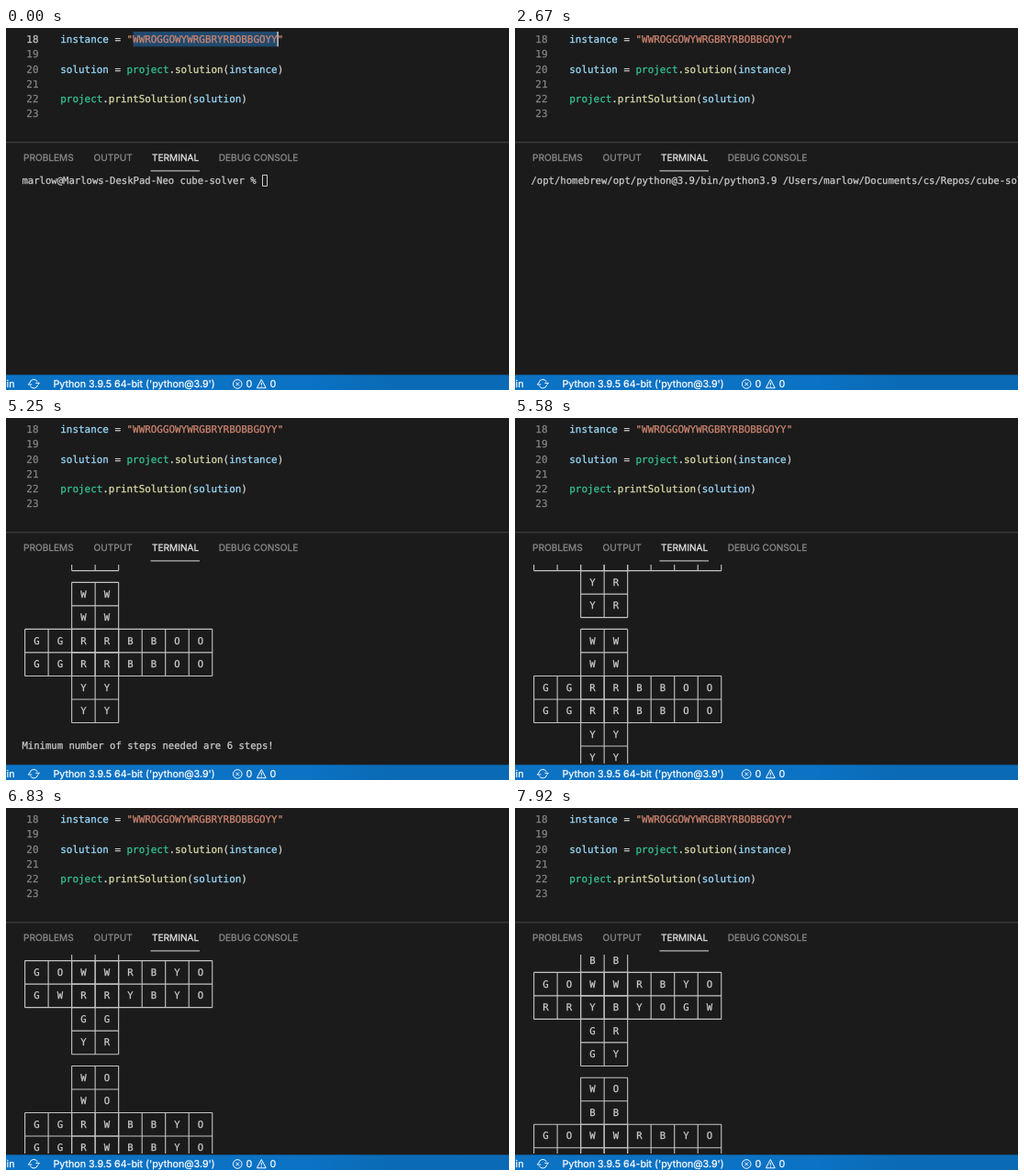
These frames come from a looping animation (548 by 395 pixels, 8 s). An HTML page with a canvas:

```html
<!DOCTYPE html>
<html lang="en">
<head>
<meta charset="utf-8">
<title>Cube solver</title>
<style>
  html, body { margin: 0; width: 100%; height: 100%; overflow: hidden; background: #1b1b1b; }
  canvas { display: block; }
</style>
</head>
<body>
<canvas id="stage" width="548" height="395"></canvas>
<script>
const ctx = document.getElementById('stage').getContext('2d');
const LOOP = 8000;
const MONO = '"DejaVu Sans Mono", monospace';
const SANS = 'Inter, sans-serif';
const EDITOR_FONT = '10.91px ' + MONO;
const TERM_FONT = '10.6px ' + MONO;
const TERM = { x: 17.4, y: 166.2, char: 6.38, row: 12.76 };
const CELL = { w: 4 * TERM.char, h: 2 * TERM.row };

const COLOR = {
  bg: '#1b1b1b', variable: '#9cdcfe', plain: '#d4d4d4', string: '#ce8570',
  module: '#35c795', call: '#dcdcaa', dim: '#858585', term: '#cccccc', grid: '#c4c4c4'
};

const CODE = [
  [['instance', 'variable'], [' = ', 'plain'], ['"WWROGGOWYWRGBRYRBOBBGOYY"', 'string']],
  [],
  [['solution', 'variable'], [' = ', 'plain'], ['project', 'module'], ['.', 'plain'],
   ['solution', 'call'], ['(', 'plain'], ['instance', 'variable'], [')', 'plain']],
  [],
  [['project', 'module'], ['.', 'plain'], ['printSolution', 'call'], ['(', 'plain'],
   ['solution', 'variable'], [')', 'plain']],
  []
];

const PROMPT = 'marlow@Marlows-DeskPad-Neo cube-solver % ';
const COMMAND = '/opt/homebrew/opt/python@3.9/bin/python3.9 ' +
  '/Users/marlow/Documents/cs/Repos/cube-solver/project.py';

// Unfolded cubes, latest first: two rows up, two around, two down.
const CUBES = [
  'WW WW GGRRBBOO GGRRBBOO YY YY',
  'WO WO GGRWBBYO GGRWBBYO YR YR',
  'WO BB GOWWRBYO GWRRYBYO GG YR',
  'WO BB GOWWRBYO RRYBYOGW GR GY'
].map(cube => cube.split(' '));

const EVENTS = { deselect: 1670, run: 2330, output: 2750, prompt: 2920 };
// [time, lines scrolled back]
const SCROLL = [[5200, 0], [5580, 5], [6830, 22], [7080, 24], [7460, 24], [7920, 36]];

function scrollAt(t) {
  if (t <= SCROLL[0][0]) return 0;
  for (let i = 1; i < SCROLL.length; i++) {
    const [t0, v0] = SCROLL[i - 1], [t1, v1] = SCROLL[i];
    if (t <= t1) return Math.round(v0 + (v1 - v0) * (t - t0) / (t1 - t0));
  }
  return SCROLL[SCROLL.length - 1][1];
}

// A hairline outline gives the slightly heavier stems of smoothed screen text.
function text(str, x, y, font, color, align = 'left') {
  ctx.font = font;
  ctx.fillStyle = ctx.strokeStyle = color;
  ctx.textAlign = align;
  ctx.lineWidth = 0.25;
  ctx.fillText(str, x, y);
  ctx.strokeText(str, x, y);
}

function rect(x, y, w, h, color) {
  ctx.fillStyle = color;
  ctx.fillRect(x, y, w, h);
}

function drawEditor(t) {
  const selected = t < EVENTS.deselect;
  if (selected) rect(138.5, 4, 157.5, 16.3, '#20496d');
  CODE.forEach((tokens, i) => {
    const y = 16.1 + i * 16.27;
    text(18 + i, 35.5, y, EDITOR_FONT, i === 0 && selected ? '#c6c6c6' : COLOR.dim, 'right');
    let x = 59.3;
    for (const [str, kind] of tokens) {
      text(str, x, y, EDITOR_FONT, COLOR[kind]);
      x += ctx.measureText(str).width;
    }
  });
  const caretOn = (t + 830) % 1000 >= 500;
  if (selected && caretOn) rect(295.3, 4, 1.6, 16.3, '#c0c0bc');
}

function drawTabs() {
  rect(0, 124.3, 548, 1, '#454545');
  const tabs = [['PROBLEMS', 19], ['OUTPUT', 95.5], ['TERMINAL', 159], ['DEBUG CONSOLE', 231.7]];
  for (const [label, x] of tabs) {
    text(label, x, 145.4, '10.1px ' + SANS, label === 'TERMINAL' ? '#e7e7e7' : '#8c8c8c');
  }
  rect(157.5, 155.4, 53.5, 1, '#dcdcdc');
}

const rowY = row => TERM.y + row * TERM.row;

function termText(str, row) {
  text(str, TERM.x, rowY(row) + 3.6, TERM_FONT, COLOR.term);
}

function drawGrid(col, y, cols, rows) {
  const x = TERM.x + TERM.char / 2 + col * CELL.w;
  const right = x + cols * CELL.w, bottom = y + rows * CELL.h;
  ctx.beginPath();
  for (let c = 0; c <= cols; c++) {
    ctx.moveTo(x + c * CELL.w, y);
    ctx.lineTo(x + c * CELL.w, bottom);
  }
  for (let r = 0; r <= rows; r++) {
    ctx.moveTo(x, y + r * CELL.h);
    ctx.lineTo(right, y + r * CELL.h);
  }
  ctx.strokeStyle = COLOR.grid;
  ctx.lineWidth = 1.1;
  ctx.stroke();
}

function drawCube(cube, row) {
  const y = rowY(row) + 0.4;
  drawGrid(2, y, 2, 6);
  drawGrid(0, y + 2 * CELL.h, 8, 2);
  cube.forEach((stickers, r) => {
    const first = stickers.length === 2 ? 2 : 0;
    [...stickers].forEach((sticker, c) => {
      const x = TERM.x + (2.5 + 4 * (first + c)) * TERM.char;
      text(sticker, x, rowY(row + 1 + 2 * r) + 3.8, TERM_FONT, COLOR.term, 'center');
    });
  });
}

function drawTerminal(t) {
  ctx.save();
  ctx.beginPath();
  ctx.rect(0, 160, 548, 217);
  ctx.clip();
  if (t < EVENTS.run) {
    termText(PROMPT, 0);
    ctx.strokeStyle = COLOR.term;
    ctx.lineWidth = 1;
    ctx.strokeRect(279.5, 160.5, 5, 12);
  } else if (t < EVENTS.output) {
    termText(COMMAND, 0);
  } else {
    const scroll = scrollAt(t);
    CUBES.forEach((cube, i) => drawCube(cube, scroll - 13 * i));
    termText('Minimum number of steps needed are 6 steps!', scroll + 14);
    if (t >= EVENTS.prompt) termText(PROMPT, scroll + 16);
  }
  ctx.restore();
}

function drawStatusBar() {
  const blue = ctx.createLinearGradient(330, 0, 420, 0);
  blue.addColorStop(0, '#0b72c4');
  blue.addColorStop(1, '#0a6ab5');
  rect(0, 378.4, 548, 16.6, blue);

  const font = '10.7px ' + SANS;
  text('in', 9.5, 392, font, '#fff', 'right');
  text("Python 3.9.5 64-bit ('python@3.9')", 51.5, 392, font, '#fff');
  text('0', 261.5, 392, font, '#fff');
  text('0', 287.5, 392, font, '#fff');

  ctx.strokeStyle = '#fff';
  ctx.lineWidth = 1;
  // Sync arrows, error circle, warning triangle
  ctx.stroke(new Path2D('M26 387a4.4 4.4 0 0 1 8.3-1M34.6 389.5a4.4 4.4 0 0 1-8.3 1' +
    'M32.4 387.4h4l-1.8 2M28.2 389.1h-4l1.8-2'));
  ctx.stroke(new Path2D('M257 388.5a4.8 4.8 0 1 1-9.6 0a4.8 4.8 0 1 1 9.6 0' +
    'M250.3 386.6l3.8 3.8M254.1 386.6l-3.8 3.8'));
  ctx.stroke(new Path2D('M278.3 383.6l4.9 9.2h-9.8zM278.3 386.8v3M278.3 390.7v1'));
}

function draw(now) {
  const t = now % LOOP;
  ctx.textRendering = 'geometricPrecision';
  ctx.lineJoin = 'round';
  rect(0, 0, 548, 395, COLOR.bg);
  drawEditor(t);
  drawTabs();
  drawTerminal(t);
  drawStatusBar();
}

const start = performance.now();
function tick() {
  draw(performance.now() - start);
  requestAnimationFrame(tick);
}
tick();
</script>
</body>
</html>
```
